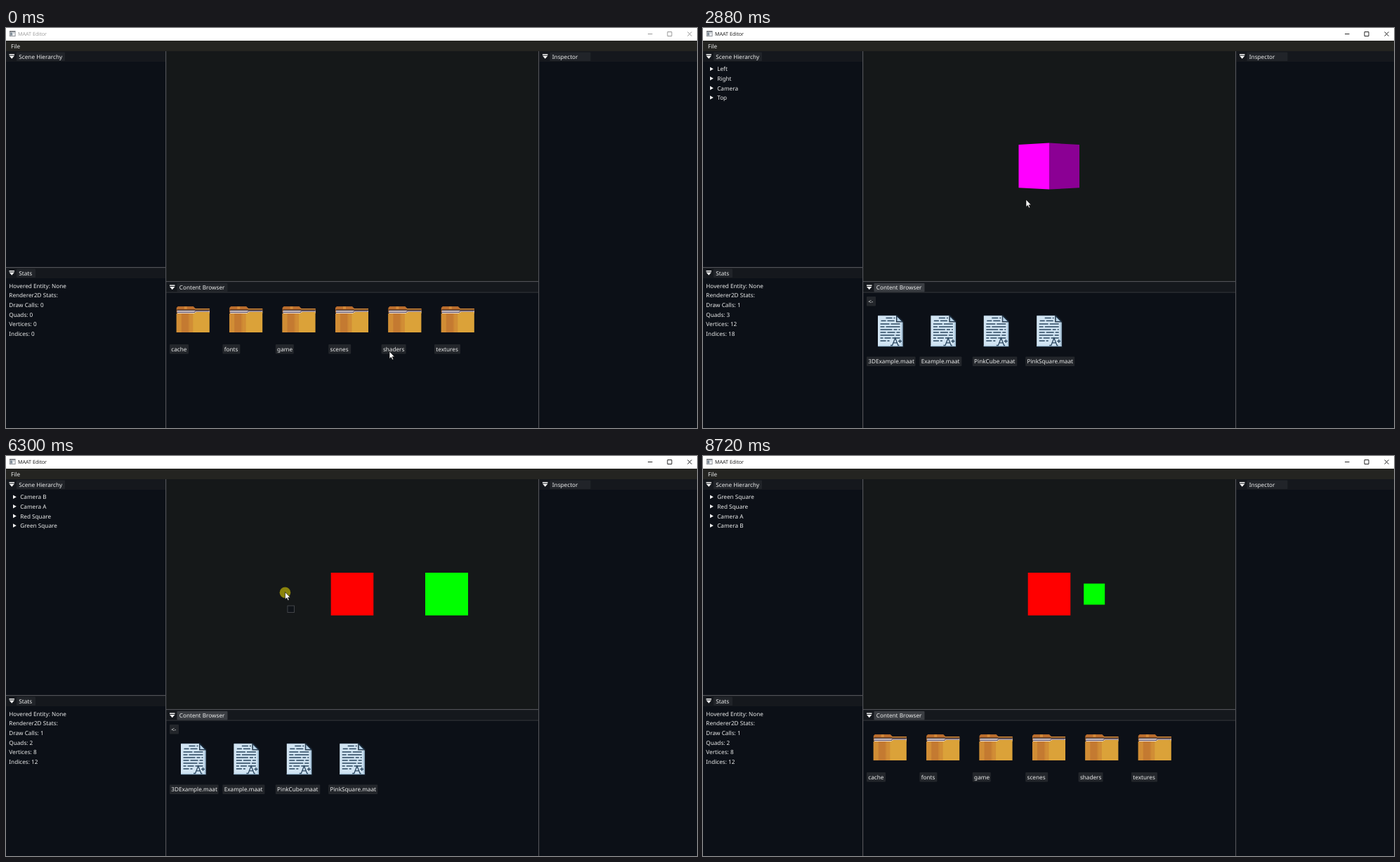
These frames come from a looping animation (984x569 px, 8.95 s). An HTML page:

```html
<!DOCTYPE html>
<html lang="en">
<head>
<meta charset="utf-8">
<title>Editor</title>
<style>
html, body { margin: 0; width: 100%; height: 100%; overflow: hidden; background: #0c1017; }
svg { display: block; width: 984px; height: 569px; }
text { font: 8.2px "Noto Sans", sans-serif; fill: #eceded; text-rendering: geometricPrecision; white-space: pre; }
.title { font: 7.2px "Open Sans", sans-serif; }
</style>
</head>
<body>
<svg id="stage" viewBox="0 0 984 569" xmlns="http://www.w3.org/2000/svg"></svg>
<script>
const NS = "http://www.w3.org/2000/svg";
const LOOP = 8950, PITCH = 75.4;
const stage = document.getElementById("stage");

function el(parent, tag, attrs, content) {
  const node = document.createElementNS(NS, tag);
  for (const k in attrs) node.setAttribute(k, attrs[k]);
  if (content !== undefined) node.textContent = content;
  return parent.appendChild(node);
}
const group = (parent = stage) => el(parent, "g", {});
const rect = (p, x, y, width, height, fill) => el(p, "rect", { x, y, width, height, fill });
const path = (p, d, fill, extra = {}) => el(p, "path", { d, fill, ...extra });
const label = (p, x, mid, s) => el(p, "text", { x, y: mid + 3 }, s);
const show = (node, on) => node.setAttribute("visibility", on ? "inherit" : "hidden");

// Window chrome
rect(stage, 0, 0, 984, 18, "#fff");
rect(stage, 5, 4, 8.5, 8, "#777b80");
rect(stage, 5.8, 5.8, 6.9, 5.4, "#f4f6f8");
rect(stage, 6.2, 6.4, 3, 4.2, "#7d8a96");
rect(stage, 10, 6.6, 2, 1, "#a8afb6");
const title = el(stage, "text", { x: 17, y: 10.8, class: "title" }, "MAAT Editor");
const controls = path(stage, "M914 8.5h6.5M942 5.5h6v6h-6zM970.5 5.5l6 6m0-6l-6 6", "none", { "stroke-width": 0.9 });
rect(stage, 0, 18, 984, 15, "#242421");
label(stage, 7, 25.6, "File");

// Panels
rect(stage, 0, 33, 984, 536, "#0c1017");
rect(stage, 228, 33, 530, 327, "#151819");
function panel(x, y, w, name, tabWidth) {
  rect(stage, x, y, w, 15, "#15181d");
  const tab = el(stage, "rect", { x: x + 15, y: y + 1.5, width: tabWidth, height: 12.5, rx: 1, fill: "#212429" });
  path(stage, `M${x + 4.5} ${y + 4}h7.5v1.4h-7.5zM${x + 4.5} ${y + 6.4}h7.5l-3.75 4.4z`, "#f4f4f4");
  label(stage, x + 18.3, y + 7.6, name);
  return tab;
}
panel(0, 33, 227, "Scene Hierarchy", 69);
panel(0, 341, 227, "Stats", 27);
panel(759.5, 33, 224.5, "Inspector", 58);
const browserTab = panel(228.5, 361.5, 529.5, "Content Browser", 72);
const LINE = "#505156";
rect(stage, 227, 33, 1.2, 536, LINE);
rect(stage, 758, 33, 1.2, 536, LINE);
rect(stage, 0, 340, 227, 1.2, LINE);
rect(stage, 228, 360, 530, 1.2, LINE);
rect(stage, 228, 375.6, 530, 1, "#34363b");

// Scenes: entity names, stats and viewport shapes
const scenes = [
  { from: 0, names: [], stats: [0, 0, 0, 0], shapes: [] },
  { from: 2820, names: ["Left", "Right", "Camera", "Top"], stats: [1, 3, 12, 18],
    shapes: [["M449.5 166L493 163.6V229.6L449.5 227.2z", "#f0f"], ["M493 163.6L536 166V227.2L493 229.6z", "#8b0094"]] },
  { from: 4810, names: ["Camera B", "Camera A", "Red Square", "Green Square"], stats: [1, 2, 8, 12],
    shapes: [["M462.7 166h60.6v60.8h-60.6z", "#f00"], ["M597 166h61v60.8h-61z", "#0f0"]] },
  { from: 6500, names: ["Green Square", "Red Square", "Camera A", "Camera B"], stats: [1, 2, 8, 12],
    shapes: [["M462.7 166h60.6v60.8h-60.6z", "#f00"], ["M542.2 181.5h30v30h-30z", "#0f0"]] }
];
const row = i => i * 13.6;
label(stage, 4.3, 366.8, "Hovered Entity: None");
label(stage, 4.3, 366.8 + row(1), "Renderer2D Stats:");
for (const s of scenes) {
  s.node = group();
  s.names.forEach((n, i) => {
    const y = 58.4 + row(i);
    path(s.node, `M10 ${y - 3}v5.6l4.8-2.8z`, "#f4f4f4");
    label(s.node, 20.2, y, n);
  });
  ["Draw Calls", "Quads", "Vertices", "Indices"].forEach((n, i) =>
    label(s.node, 4.3, 366.8 + row(i + 2), `${n}: ${s.stats[i]}`));
  s.shapes.forEach(([d, c]) => path(s.node, d, c));
}

// Content browser
function folder(p, x, y) {
  const g = el(p, "g", { transform: `translate(${x} ${y})` });
  path(g, "M0 2l2-2h22l3 3h20v6h-47z", "#b96c2c");
  path(g, "M11 0h4v4h-4zM26 3h21v3h-21z", "#cf8636");
  rect(g, 0.6, 4.6, 46.4, 1.4, "#3b2b2c");
  rect(g, 1, 6, 46, 4, "#e9e3e6");
  path(g, "M1 7.6h24l2-1.4h19.5v1.2h-19l-2 1.6h-24.500z", "#6d5a66");
  path(g, "M0 10h24.500l4-2h18.500v29h-47z", "#dba239");
  path(g, "M0 10h23.500v27h-23.500z", "#d18d35");
  rect(g, 7, 10, 10, 27, "#c47a31");
  rect(g, 17, 10, 1.5, 27, "#cb8433");
}
function page(p, x, y) {
  const g = el(p, "g", { transform: `translate(${x} ${y})` });
  path(g, "M1 0h27l9 9v37.500h-36z", "#17222e");
  path(g, "M0.500 1.200h26v9.300h9.300v34.500h-35.300z", "#d2e5f3");
  path(g, "M33.800 11h2v34h-2zM0.500 43.500h35.300v1.500h-35.300z", "#a9c6dc");
  path(g, "M27.500 2l7.600 7.500h-7.600z", "#b9d3e6", { stroke: "#28415a", "stroke-width": 0.9 });
  const ink = { stroke: "#2b4760", "stroke-width": 1.5 };
  path(g, "M12 4.500h9m2 0h2M5 8.500h7m2 0h10", "none", ink);
  [[4, "13 2 13"], [4, "6 2 20"], [4, "17 2 5 2 2"], [4, "8 2 11 2 5"], [4, "20 2 6"], [4, "4 2 9 2 11"]].forEach(([left, dash], i) =>
    el(g, "path", { d: `M${left} ${13 + i * 4}h28`, fill: "none", ...ink, "stroke-dasharray": dash + " 40" }));
  path(g, "M4 37h8m2 0h3", "none", ink);
  path(g, "M18.500 43.500h2.500l4.200-10.500 4.200 10.500h1.500M22 39.800h6.500M29.500 37.500h5M32 35v5", "none", { ...ink, "stroke-width": 1.3 });
}
function listing(names, top, widths, icon, dx, dy) {
  const node = group();
  const cells = names.map((n, i) => {
    const x = 233 + i * PITCH;
    const hover = rect(node, x, top, 67, 65.500, "#3a3d40");
    icon(node, x + dx, top + dy);
    el(node, "rect", { x, y: top + 69, width: widths[i], height: 13.5, rx: 1, fill: "#23262b" });
    label(node, x + 2.300, top + 75.800, n);
    return { x, hover };
  });
  return { node, cells, top };
}
const folders = listing(["cache", "fonts", "game", "scenes", "shaders", "textures"], 381,
  [27, 25, 26, 32, 35, 37], folder, 9.800, 15);
const files = listing(["3DExample.maat", "Example.maat", "PinkCube.maat", "PinkSquare.maat"], 398.500,
  [69.500, 60, 63.500, 70], page, 15.500, 9.500);
const back = el(files.node, "rect", { x: 233, y: 382, width: 13, height: 13.500, rx: 1 });
const backText = label(files.node, 235.200, 389, "<-");

// Pointer
const pointer = group();
const ring = el(pointer, "circle", { cx: 0, cy: 0.800, r: 7.800, fill: "#ffee00", "fill-opacity": 0.5 });
const tip = el(pointer, "rect", { x: 3.500, y: 19.500, width: 9.500, height: 9.500, fill: "#101419", stroke: "#474a4e", "stroke-width": 0.9 });
path(pointer, "M0 0V10.400L2.400 8.300L4.100 12L5.700 11.300L4.100 7.700H7.300z", "#fff", { stroke: "#000", "stroke-width": 0.6 });

// Moves: start, end, then the points passed through
const moves = [
  [20, 510, [546, 460], [487, 415]],
  [1490, 1910, [487, 415], [412, 421]],
  [2080, 2740, [412, 421], [460, 244]],
  [3150, 4050, [460, 244], [336, 424]],
  [4070, 4720, [336, 424], [424, 205]],
  [5090, 5980, [424, 205], [264, 413]],
  [6000, 6385, [264, 413], [416, 163]],
  [7000, 7560, [416, 163], [270, 412]],
  [7560, 7830, [270, 412], [237, 387]],
  [8370, 8720, [237, 387], [574, 571]]
];
const drags = [[2090, 2820], [4080, 4810], [5985, 6500]];
const presses = [[780, 840], [900, 960], [8010, 8060], ...drags];
const within = (spans, t) => spans.some(([a, b]) => t >= a && t < b);
const ease = u => u * u * (3 - 2 * u);

function pointerAt(t) {
  let pos = moves[0][2];
  for (const [a, b, p, q] of moves) {
    if (t < a) break;
    const k = ease(Math.min(1, (t - a) / (b - a)));
    pos = p.map((v, i) => v + (q[i] - v) * k);
  }
  return pos;
}

function draw(t) {
  const [x, y] = pointerAt(t);
  const dragging = within(drags, t);
  const active = t >= 780;
  const inFiles = t >= 980 && t < 8110;

  title.style.fill = active ? "#111" : "#999";
  controls.setAttribute("stroke", active ? "#111" : "#8d8d8d");
  browserTab.setAttribute("fill", active ? "#3a3d42" : "#212429");

  scenes.forEach((s, i) => show(s.node, t >= s.from && (i === scenes.length - 1 || t < scenes[i + 1].from)));

  show(files.node, inFiles);
  show(folders.node, !inFiles);
  for (const list of [files, folders])
    for (const c of list.cells)
      show(c.hover, !dragging && x >= c.x && x < c.x + 67 && y >= list.top && y < list.top + 65.500);
  const onBack = x >= 233 && x < 246 && y >= 382 && y < 395.500;
  back.setAttribute("fill", onBack ? "#13171c" : "#23262b");
  backText.style.fill = onBack ? "#777" : "";

  pointer.setAttribute("transform", `translate(${x.toFixed(2)} ${y.toFixed(2)})`);
  show(pointer, t < 8720);
  show(ring, within(presses, t));
  show(tip, dragging && Math.hypot(x - 412, y - 421) > 4 && y < 408);
}

function tick(now) {
  draw(now % LOOP);
  requestAnimationFrame(tick);
}
draw(0);
requestAnimationFrame(tick);
</script>
</body>
</html>
```
